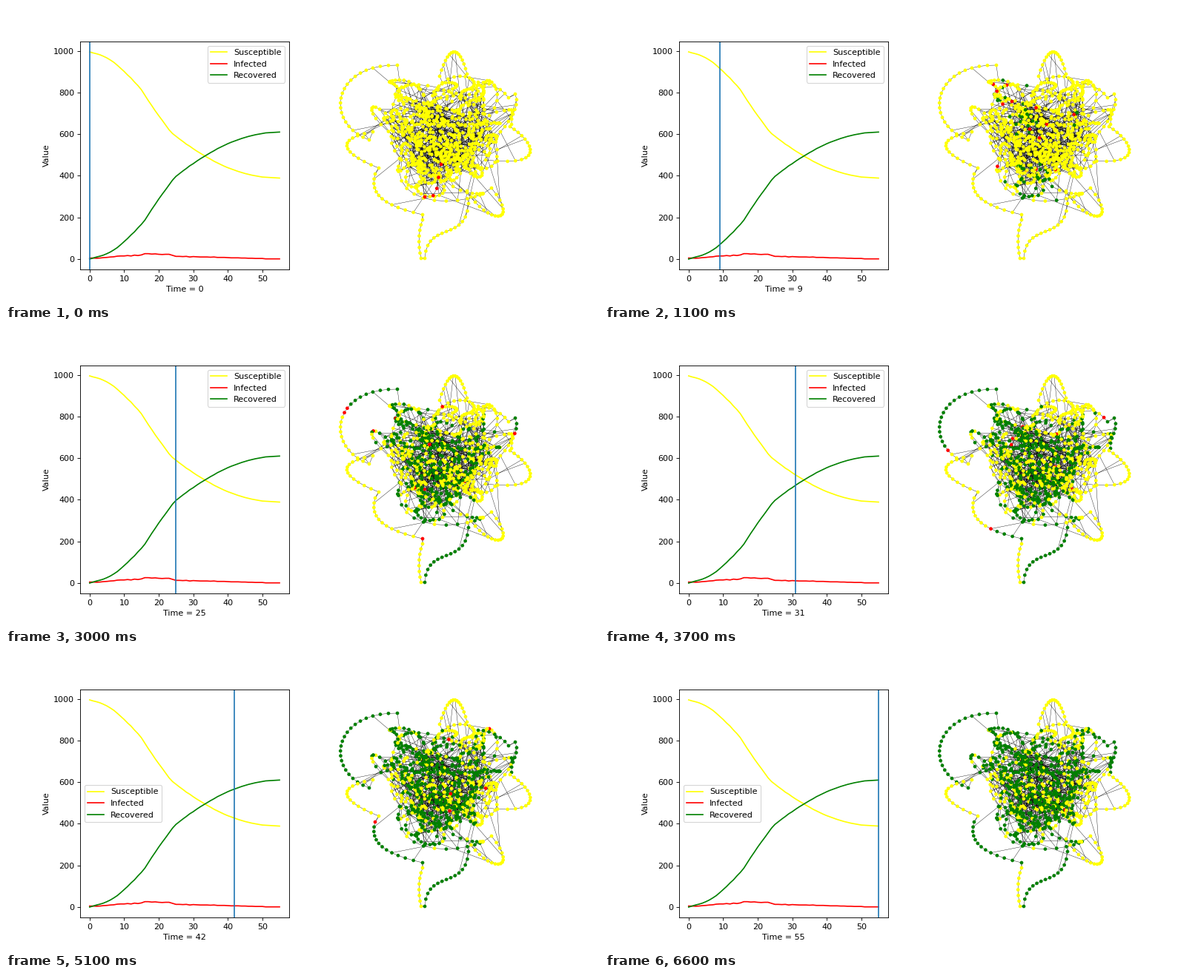
A matplotlib script that plays this animation: 800x400 px, repeating every 6.7 s.

```python
import numpy as np
import matplotlib.pyplot as plt
from matplotlib.animation import FuncAnimation
from matplotlib.collections import LineCollection

NODES, FRAMES, STEP = 1000, 67, 1.2
NEVER = 99
rng = np.random.default_rng(12)


def epidemic():
    """Counts per day; a case recovers one day after infection."""
    days = np.arange(56)
    rate = np.interp(days, [0, 2, 10, 15, 16, 20, 23, 25, 36, 41, 49, 52],
                     [5, 4, 16, 18, 27, 23, 23, 13, 9, 6.5, 3, 1])
    total = np.rint(np.cumsum(rate) + rng.normal(0, 0.04, 56) * rate)
    cases = np.diff(total, prepend=0).astype(int)
    return days, NODES - total, cases, total - cases


# Strands outside the tangle: node count, first and last infection day,
# then a cubic Bezier curve in pixels.
STRANDS = [
    (22, 19, 34, (528, 80), (440, 78), (428, 158), (490, 181)),
    (16, NEVER, NEVER, (585, 95), (598, 50), (612, 53), (622, 92)),
    (7, 38, 30, (637, 103), (650, 102), (670, 112), (678, 124)),
    (7, 22, 28, (687, 119), (694, 135), (680, 145), (682, 160)),
    (16, NEVER, NEVER, (680, 163), (708, 180), (736, 219), (647, 208)),
    (14, NEVER, NEVER, (495, 170), (440, 180), (455, 200), (503, 219)),
    (13, 42, 25, (498, 227), (490, 255), (510, 270), (562, 282)),
    (8, NEVER, NEVER, (562, 289), (556, 304), (556, 325), (560, 341)),
    (15, 24, 16, (565, 341), (568, 290), (620, 320), (624, 267)),
    (17, NEVER, NEVER, (622, 250), (650, 296), (695, 296), (655, 246)),
    (5, 0, 0, (587, 214), (580, 238), (586, 262), (565, 258)),
]

# Outbreak centres (x, y, day) and sheltered areas (x, y, radius).
OUTBREAKS = [(575, 248, 0), (520, 240, 2), (522, 110, 3), (570, 110, 4),
             (570, 155, 4), (635, 145, 6), (620, 185, 9), (600, 275, 11)]
SHELTERS = [(615, 85, 34), (490, 195, 28), (665, 205, 30)]


def bezier(count, p0, p1, p2, p3):
    t = np.linspace(0, 1, count)[:, None]
    u = 1 - t
    return (u**3 * np.array(p0) + 3 * u * u * t * np.array(p1)
            + 3 * u * t * t * np.array(p2) + t**3 * np.array(p3))


def tangle(count):
    """A smooth closed random path filling a round blob."""
    z = rng.normal(size=count) + 1j * rng.normal(size=count)
    blur = np.exp(-2 * (np.pi * 4.5 * np.fft.fftfreq(count)) ** 2)
    z = np.fft.ifft(np.fft.fft(z) * blur)
    z /= z.std() / np.sqrt(2)
    r = np.abs(z)
    z *= np.tanh(0.42 * r) / r
    return np.c_[587 + 118 * z.real, 171 + 110 * z.imag]


def distance(a, b):
    return np.hypot(*(a - b).T)


def build_network():
    inner = NODES - sum(s[0] for s in STRANDS)
    core = tangle(inner)
    curves = [bezier(n, *pts) for n, _, _, *pts in STRANDS]
    pos = np.vstack([core, *curves])
    edges = [(i, (i + 1) % inner) for i in range(inner)]

    # Shortcuts, shorter ones being likelier.
    a, b = rng.integers(inner, size=(2, 9000))
    keep = rng.random(9000) < np.exp(-distance(core[a], core[b]) / 42)
    edges += list(zip(a[keep], b[keep]))[:480]

    start = inner
    for curve in curves:
        end = start + len(curve)
        edges += [(i, i + 1) for i in range(start, end - 1)]
        for i in range(start, end):
            gap = distance(pos, pos[i])
            if i in (start, end - 1):
                gap[start:end] = np.inf
                edges.append((i, gap.argmin()))
            elif gap[:inner].min() < 35 and rng.random() < 0.5:
                edges.append((i, rng.choice(gap[:inner].argsort()[:60])))
        start = end
    return core, pos, pos[np.array(edges)]


def infection_days(core):
    """Strands burn like fuses; the core catches outwards from outbreaks."""
    fuse = np.concatenate([np.linspace(first, last, n).round().astype(int)
                           for n, first, last, *_ in STRANDS])
    score = np.min([day + distance(core, c) / 4 for *c, day in OUTBREAKS],
                   axis=0)
    score += rng.exponential(14, len(core))
    for x, y, r in SHELTERS:
        score += 25 * np.exp(-(distance(core, (x, y)) / r) ** 2)
    left = [max(0, n - np.sum(fuse == day)) for day, n in enumerate(cases)]
    ranked = np.repeat(days, left)
    when = np.full(len(core), NEVER)
    when[score.argsort()[:len(ranked)]] = ranked
    return np.r_[when, fuse]


days, susceptible, cases, recovered = epidemic()
core, pos, segments = build_network()
when = infection_days(core)

fig = plt.figure(figsize=(10, 5), dpi=80)
ax = fig.add_subplot(121)
ax.plot(days, susceptible, color="yellow", label="Susceptible")
ax.plot(days, cases, color="red", label="Infected")
ax.plot(days, recovered, color="green", label="Recovered")
ax.set_ylabel("Value")
marker = ax.axvline(0)
ax.legend(loc="best")  # steps aside once the marker reaches it

net = fig.add_axes([0, 0, 1, 1])
net.set(xlim=(0, 800), ylim=(400, 0))
net.axis("off")
net.add_collection(LineCollection(segments, colors="black", linewidths=0.35,
                                  zorder=1))
dots = net.scatter(*pos.T, s=18, linewidths=0, zorder=2)
palette = np.array(["green", "red", "yellow"])


def update(n):
    day = int((n + 0.5) / STEP)
    marker.set_xdata([day, day])
    ax.set_xlabel(f"Time = {day}")
    dots.set_facecolor(palette[np.sign(when - day) + 1])
    return marker, dots


anim = FuncAnimation(fig, update, frames=FRAMES, interval=100, repeat=True)
plt.show()
```
